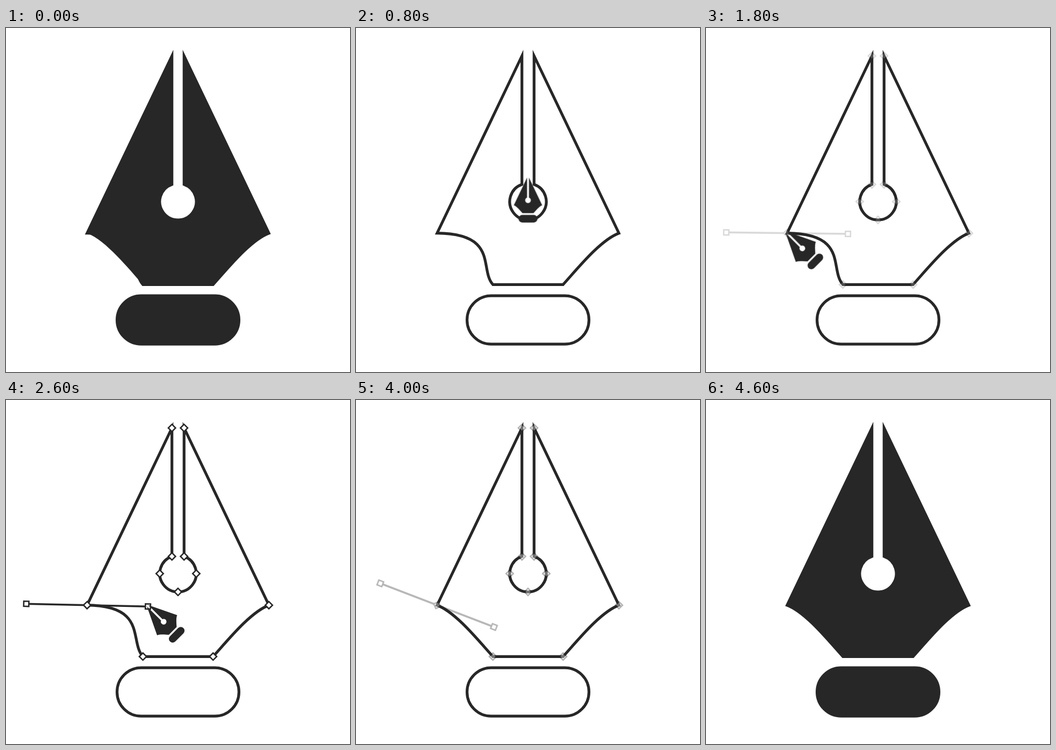
Animation, 640 px wide and 640 px high, one loop 5.6 s. Source, as an HTML page:

```html
<!DOCTYPE html>
<html lang="en">
<head>
<meta charset="utf-8">
<title>Pen tool</title>
<style>
  html, body { margin: 0; width: 100%; height: 100%; overflow: hidden; background: #fff; }
  svg { display: block; width: 100%; height: 100%; }
  .solid { fill: #272727; }
  .outline { fill: none; stroke: #272727; stroke-width: 5.2; stroke-miterlimit: 10; }
  #anchors rect { fill: #fff; stroke: #272727; stroke-width: 2.6; }
  #anchors line { stroke: #272727; stroke-width: 3.5; }
</style>
</head>
<body>
<svg viewBox="0 0 640 640">
  <defs><rect id="ferrule" x="206.6" y="498.1" width="226.8" height="90.1" rx="45"/></defs>
  <g class="solid" id="fill"><path class="nib"/><use href="#ferrule"/></g>
  <g class="outline"><path id="outline"/><use href="#ferrule"/></g>
  <g id="anchors"><g id="handle"><line/></g></g>
  <g class="solid" id="pen"><path class="nib"/><use href="#ferrule"/></g>
</svg>
<script>
const LOOP = 5600, STEP = 100;
const CENTER = 320, REACH = 113.2, GRIP = 28;

// Left half of the nib; the right half mirrors it
const TIP = [308.7, 52], THROAT = [308.7, 291], RING = [286, 323];
const CORNER = [150.9, 381.7], BASE = [254.7, 477.3];
const CURVE_OUT = [186, 395], CURVE_IN = [229, 449], BULGE = [266, 383];

const $ = id => document.getElementById(id);
const mirror = ([x, y]) => [2 * CENTER - x, y];
const mix = (a, b, p) => a + (b - a) * p;
const mixPoint = (a, b, p) => a.map((v, i) => mix(v, b[i], p));
const clamp = x => Math.min(1, Math.max(0, x));
const ease = (t, from, to) => {
  const x = clamp((t - from) / (to - from));
  return x * x * (3 - 2 * x);
};

// bend 0: left curve bulges; bend 1: it mirrors the right one
const nibPath = bend => `M${TIP}L${CORNER}
  C${mixPoint(BULGE, CURVE_OUT, bend)} ${CURVE_IN} ${BASE}
  L${mirror(BASE)}C${[CURVE_IN, CURVE_OUT, CORNER].map(mirror).join(' ')}
  L${mirror(TIP)}L${mirror(THROAT)}A34 34 0 1 1 ${THROAT}Z`;

function setAttributes(node, attributes) {
  for (const key in attributes) node.setAttribute(key, attributes[key]);
}

function addSquare(parent, [x, y], angle) {
  const square = document.createElementNS('http://www.w3.org/2000/svg', 'rect');
  setAttributes(square, {
    x: -4.75, y: -4.75, width: 9.5, height: 9.5,
    transform: `translate(${x} ${y}) rotate(${angle})`
  });
  parent.append(square);
}

for (const point of [TIP, THROAT, RING, BASE]) {
  addSquare($('anchors'), point, 45);
  addSquare($('anchors'), mirror(point), 45);
}
addSquare($('anchors'), mirror(CORNER), 45);
addSquare($('anchors'), [CENTER, 357], 45);
for (const side of [-1, 0, 1]) addSquare($('handle'), [side * REACH, 0], side ? 0 : 45);
setAttributes(document.querySelector('line'), { x1: -REACH, x2: REACH });
document.querySelectorAll('.nib').forEach(nib => nib.setAttribute('d', nibPath(1)));

function render(t) {
  const approach = ease(t, 800, 1470);
  const slide = ease(t, 1850, 2550);
  const drag = ease(t, 2550, 3050);
  const leave = ease(t, 3050, 3570);
  const vanish = ease(t, 3570, 3900);

  // The pen goes from the centre to the corner, then along the handle
  const angle = mix(0.7, 21, drag);
  const radians = angle * Math.PI / 180;
  const held = [
    CORNER[0] + GRIP + slide * REACH * Math.cos(radians) + 10 * Math.sin(Math.PI * drag),
    CORNER[1] + GRIP + slide * REACH * Math.sin(radians)
  ];
  const [x, y] = mixPoint([CENTER, CENTER], held, approach);
  const penX = x - 65 * leave + 17 * vanish;
  const penY = y - 11 * leave * leave + 21 * vanish;
  const scale = mix(1, 0.156, clamp(t / 763));

  $('outline').setAttribute('d', nibPath(drag));
  $('handle').setAttribute('transform', `translate(${CORNER}) rotate(${angle})`);
  $('anchors').setAttribute('opacity', ease(t, 1580, 2400) - ease(t, 3700, 4200));
  setAttributes($('pen'), {
    transform: `translate(${penX} ${penY}) rotate(${-45 * approach})
      scale(${scale}) translate(${-CENTER} ${-CENTER})`,
    opacity: 1 - vanish
  });
  $('fill').setAttribute('opacity', ease(t, 4200, 4600));
}

const began = performance.now();
function tick() {
  const t = (performance.now() - began) % LOOP;
  render(Math.floor(t / STEP) * STEP);
  requestAnimationFrame(tick);
}
tick();
</script>
</body>
</html>
```
